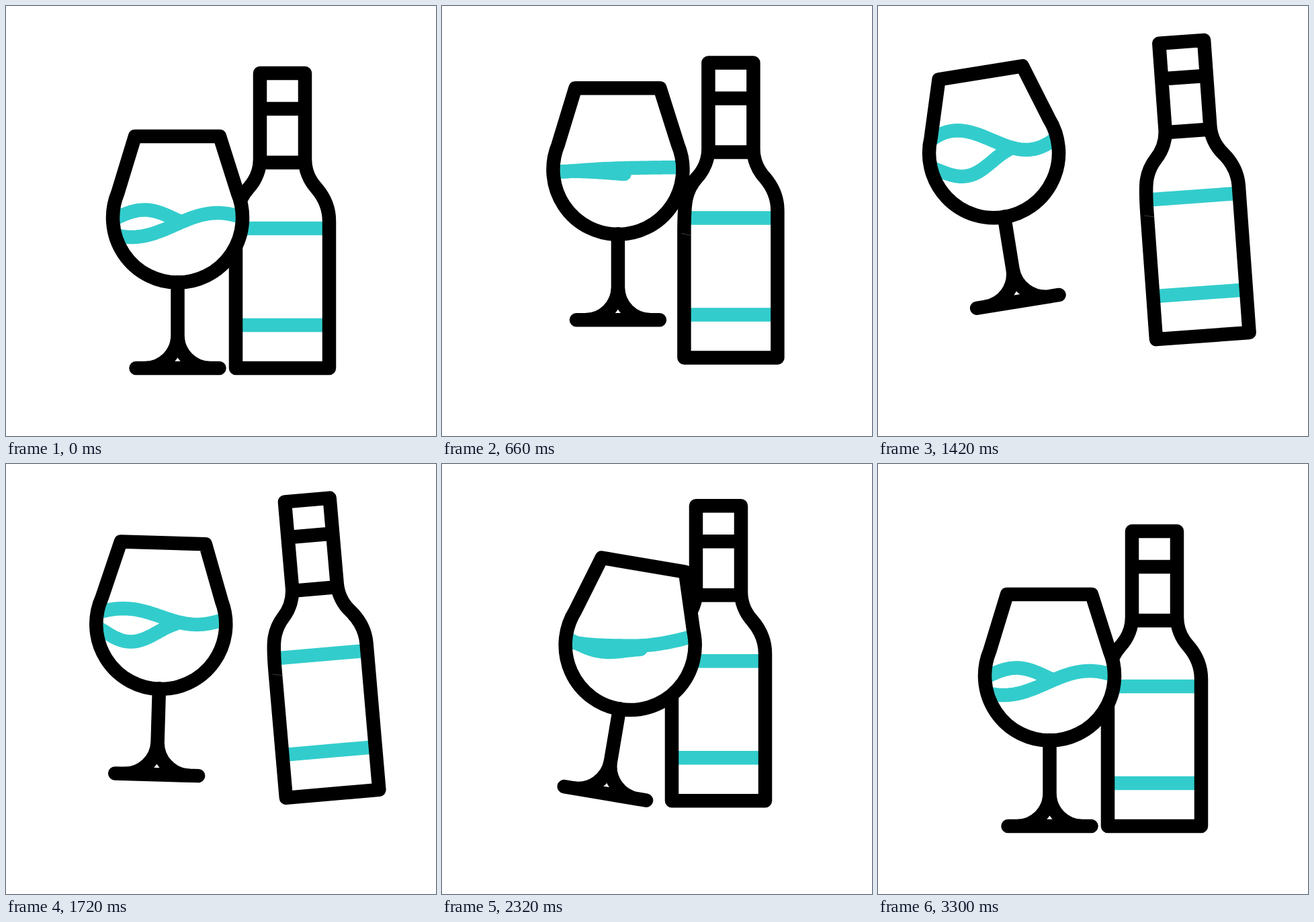
Animation, 640 px wide and 640 px high, one loop 3600 ms. Source, as an HTML page:

```html
<!DOCTYPE html>
<html>
<head>
<meta charset="utf-8">
<title>Wine glass and bottle</title>
<style>
html, body { margin: 0; height: 100%; overflow: hidden; background: #fff; }
svg { display: block; width: 100%; height: 100%; }
g { fill: none; stroke: #000; stroke-width: 20.5; stroke-linecap: round; stroke-linejoin: round; }
.cyan { stroke: #33cccc; }
.fill { fill: #fff; stroke: none; }
</style>
</head>
<body>
<svg viewBox="0 0 640 640">
  <defs>
    <path id="bowl" d="M192 194H318L344.600 278A96.500 96.500 0 1 1 166.400 278Z"/>
    <clipPath id="inside"><use href="#bowl"/></clipPath>
  </defs>
  <g id="bottle">
    <path class="cyan" d="M342 331H481M342 475H481" stroke-linecap="butt"/>
    <path d="M378 100H445V228C445 243 451 259 462 271C474 285 481 302 481 320V539H342V353C342 310 343 291 361 271C372 259 378 243 378 228ZM378 153H445M378 233H445"/>
    <path d="M338 354L352 357" stroke="#555" stroke-width=".7"/>
  </g>
  <g id="glass">
    <use href="#bowl" class="fill"/>
    <g class="cyan" clip-path="url(#inside)"><path id="long"/><path id="short"/></g>
    <use href="#bowl"/>
    <path d="M255.500 411V490A49 49 0 0 1 206.500 539M255.500 490A49 49 0 0 0 304.500 539M193.500 539H317.500"/>
  </g>
</svg>
<script>
const LOOP = 3600;
const $ = id => document.getElementById(id);
const mix = (a, b, s) => a + (b - a) * s;

// Progress from 0 to 1 between two times, plain or eased at both ends
const progress = (t, from, to) => Math.min(Math.max((t - from) / (to - from), 0), 1);
const ease = (t, from, to) => {
  const u = progress(t, from, to);
  return u * u * (3 - 2 * u);
};

function place(id, x, y, turn, cx, cy) {
  $(id).setAttribute("transform", `translate(${x} ${y}) rotate(${turn} ${cx} ${cy})`);
}

// Cosine wave whose lowest (amp > 0) or highest (amp < 0) point lies at x = peak
const wave = (mid, amp, peak, half) => x => mid + amp * Math.cos(Math.PI * (x - peak) / half);
const longCalm = wave(326, 18, 187, 128);
const longFlip = wave(295, -24, 198, 115);
const shortCalm = wave(317, -13.5, 206, 90);
const shortFlip = wave(327, 15.5, 210, 82);

function drawWave(id, end, height) {
  const points = [];
  for (let i = 0; i <= 40; i++) {
    const x = mix(160, end, i / 40);
    points.push(`${x} ${height(x)}`);
  }
  $(id).setAttribute("d", "M" + points.join("L"));
}

function drawBottle(t) {
  const x = 56 * (ease(t, 306, 1231) - ease(t, 1700, 2190));
  const y = -47.3 * (ease(t, 306, 1231) - ease(t, 2190, 2645));
  const turn = -5 * (ease(t, 760, 1660) - ease(t, 1690, 2190));
  place("bottle", x, y, turn, 411.5, 319.5);
}

function drawGlass(t) {
  const swing = ease(t, 1300, 2100), settle = ease(t, 2100, 2840);
  const x = 6.5 * ease(t, 290, 680) - 87.5 * ease(t, 680, 1300) + 101.5 * swing - 20.5 * settle;
  const y = -104 * ease(t, 290, 880) + 38 * ease(t, 1200, 2000) + 66 * ease(t, 2020, 2850);
  const turn = -10.6 * ease(t, 760, 1300) + 22.8 * swing - 12.2 * settle;
  place("glass", x, y, turn, 255.3, 366.5);

  // The waves flip together; the long one falls back first
  const flip = ease(t, 260, 1230);
  const longSide = flip * (1 - progress(t, 1400, 3300)) ** 2;
  const shortSide = flip - ease(t, 1840, 3230);
  const climb = x => 3.1 * Math.max(turn, 0) * (Math.max(x - 256, 0) / 96) ** 2;
  drawWave("long", 352, x => mix(longCalm(x), longFlip(x), longSide) - climb(x));
  drawWave("short", mix(258, 277, shortSide), x => mix(shortCalm(x), shortFlip(x), shortSide));
}

const start = performance.now();
function loop() {
  const t = (performance.now() - start) % LOOP;
  drawBottle(t);
  drawGlass(t);
  requestAnimationFrame(loop);
}
loop();
</script>
</body>
</html>
```
